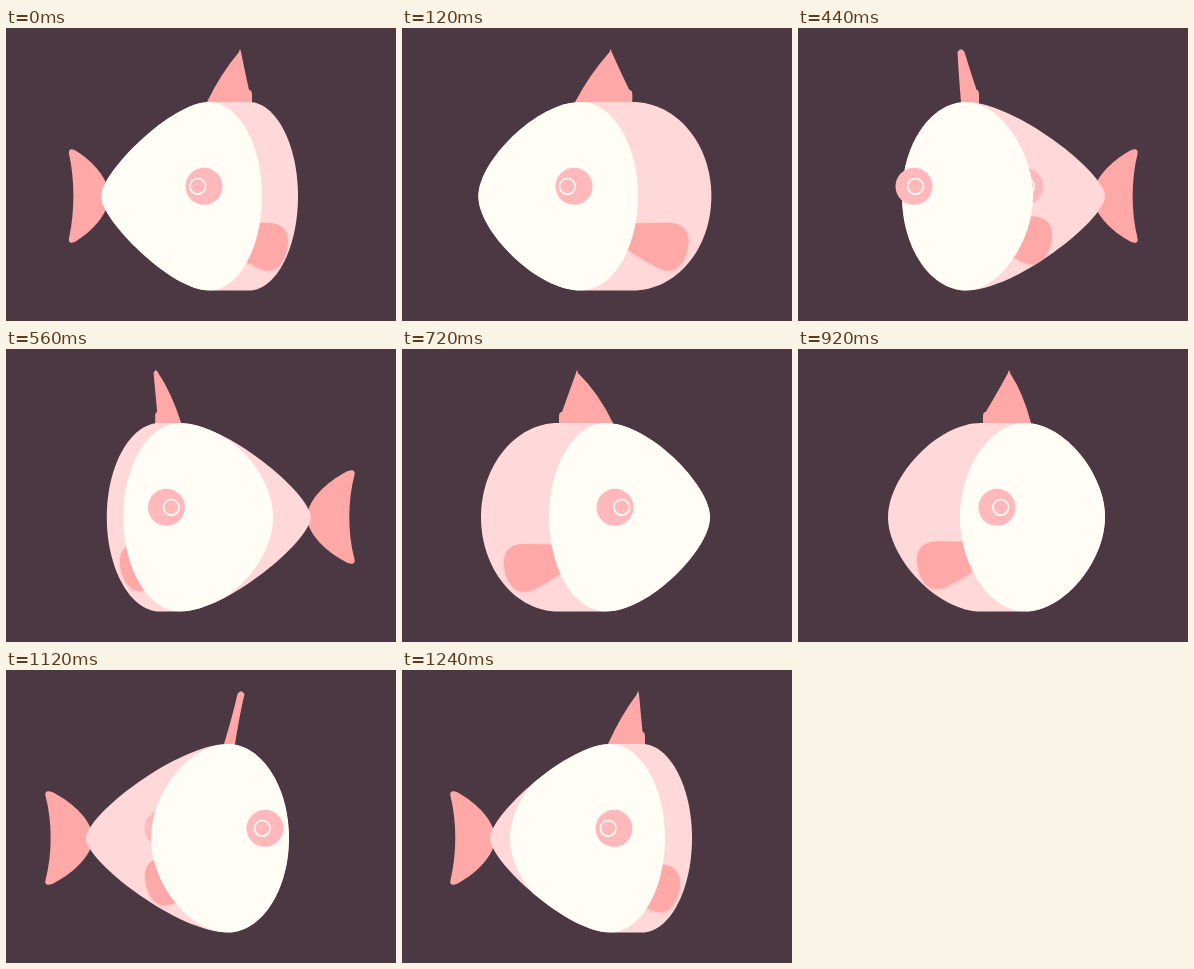
These frames come from a looping animation (390 by 293 pixels, 1.28 s). An HTML page with a canvas:

```html
<!DOCTYPE html>
<html lang="en">
<head>
<meta charset="utf-8">
<title>Turning fish</title>
<style>
html, body { margin: 0; width: 100%; height: 100%; overflow: hidden; background: #4b3842; }
canvas { display: block; width: 390px; height: 293px; }
</style>
</head>
<body>
<canvas id="stage"></canvas>
<script>
const W = 390, H = 293, STEP = 40, STEPS = 32, HALF = 16;
const MIRROR = 388, AXIS = MIRROR / 2;
const TOP = 74, MID = 168.2, RY = 94.3, BOTTOM = MID + RY;
const COLOR = { back: '#4b3842', cream: '#fffdf6', pink: '#ffd9d9', fin: '#ffa8a8', eye: '#ffb9bb' };

const canvas = document.getElementById('stage');
const ctx = canvas.getContext('2d');
const ratio = window.devicePixelRatio || 1;
canvas.width = W * ratio;
canvas.height = H * ratio;
ctx.scale(ratio, ratio);

// step | cream left, top, right | body left, far top, right | dorsal left, apex, right | notch, sharp left, sharp right
const half = [
  [-2, 153, 220, 284,  81, 220, 284, 207, 225, 225, -.8, 1, 0],
  [-1, 145, 222, 283,  80, 222, 283, 218, 235, 229, 0, 1, 0],
  [2, 108, 208, 263,  88, 240, 290, 206, 236, 243, .8, 1, 0],
  [3,  96, 203, 256,  95, 243, 292, 201, 234, 246, 1, 1, 0],
  [5,  80, 184, 241,  80, 232, 309, 177, 213, 231, 1, .7, 0],
  [9,  78, 169, 228,  78, 222, 296, 169, 196, 225, .9, .4, .1],
  [10, 81, 161, 226,  81, 205, 298, 155, 177, 203, .9, .3, .4]
];

// The second half turn is the first one seen in a mirror.
function mirrored([k, cL, cT, cR, bL, pT, bR, dL, dA, dR, n, sL, sR]) {
  const m = x => MIRROR - x;
  return [k + HALF, m(cR), m(cT), m(cL), m(bR), m(pT), m(bL), m(dR), m(dA), m(dL), -n, sR, sL];
}
const poses = half.concat(half.map(mirrored));

const eyeTrack = [[-2, 272], [-1, 259], [2, 212], [3, 198], [5, 175], [9, 185], [10, 189], [14, 227], [15, 231]];
const pectoralTrack = [[2, 278], [3, 282], [5, 286], [9, 278], [10, 269], [14, 254], [15, 249]];

// Periodic Hermite curve through unevenly spaced keys.
function sample(track, s, col) {
  const n = track.length;
  const key = i => {
    const turn = Math.floor(i / n);
    const row = track[i - turn * n];
    return [row[0] + turn * STEPS, row[col]];
  };
  const first = track[0][0];
  s = first + ((s - first) % STEPS + STEPS) % STEPS;
  let i = 0;
  while (key(i + 1)[0] <= s) i++;
  const [a, b, c, d] = [key(i - 1), key(i), key(i + 1), key(i + 2)];
  const slope = (p, q) => (q[1] - p[1]) / (q[0] - p[0]);
  const gap = c[0] - b[0], before = b[0] - a[0], after = d[0] - c[0];
  const mid = slope(b, c);
  const m0 = (slope(a, b) * gap + mid * before) / (gap + before);
  const m1 = (mid * after + slope(c, d) * gap) / (gap + after);
  const u = (s - b[0]) / gap, v = 1 - u;
  return b[1] * v * v * (1 + 2 * u) + c[1] * u * u * (3 - 2 * u)
    + gap * u * v * (m0 * v - m1 * u);
}

function shell(left, topL, topR, right, sharpL, sharpR) {
  const flat = p => .55 - .2 * p, steep = p => .55 - .3 * p;
  const l = topL - flat(sharpL) * (topL - left), lh = steep(sharpL) * RY;
  const r = topR + flat(sharpR) * (right - topR), rh = steep(sharpR) * RY;
  const path = new Path2D();
  path.moveTo(topL, TOP);
  path.lineTo(topR, TOP);
  path.bezierCurveTo(r, TOP, right, MID - rh, right, MID);
  path.bezierCurveTo(right, MID + rh, r, BOTTOM, topR, BOTTOM);
  path.lineTo(topL, BOTTOM);
  path.bezierCurveTo(l, BOTTOM, left, MID + lh, left, MID);
  path.bezierCurveTo(left, MID - lh, l, TOP, topL, TOP);
  return path;
}

function fill(path, color) {
  ctx.fillStyle = color;
  ctx.fill(path);
}

function drawTail(angle) {
  const x = r => AXIS - r * Math.cos(angle);
  const p = new Path2D();
  p.moveTo(x(157.5), 126);
  p.bezierCurveTo(x(159), 120, x(153), 120, x(147), 124);
  p.bezierCurveTo(x(130), 133, x(110), 150, x(109), MID);
  p.bezierCurveTo(x(110), 186, x(130), 203, x(147), 212);
  p.bezierCurveTo(x(153), 216, x(159), 216, x(157.5), 210);
  p.bezierCurveTo(x(150.5), 184, x(150.5), 152, x(157.5), 126);
  fill(p, COLOR.fin);
}

function drawDorsal(left, apex, right, notch) {
  const tip = Math.max(1, Math.min(3.5, (40 - right + left) / 6));
  const inL = left + 3 * Math.max(0, -notch), inR = right - 3 * Math.max(0, notch);
  const bulgeL = notch > 0 ? 3 * notch : 0, bulgeR = notch < 0 ? -3 * notch : 0;
  const p = new Path2D();
  p.moveTo(left, 82);
  p.lineTo(left, notch < 0 ? 67 : 74);
  if (notch < 0) p.quadraticCurveTo(left, 63, inL, 63);
  p.quadraticCurveTo((left + apex) / 2 - bulgeL, 46, apex - tip, 24);
  p.quadraticCurveTo(apex, 18.5, apex + tip, 24);
  p.quadraticCurveTo((inR + apex + tip) / 2 + bulgeR, 44, inR, notch > 0 ? 62 : 74);
  if (notch > 0) p.quadraticCurveTo(right, 62, right, 67);
  p.lineTo(right, 82);
  fill(p, COLOR.fin);
}

function drawPectoral(s, flip) {
  const r = sample(pectoralTrack, s, 1);
  const y = 238 + 5 * Math.cos((s - 4.4) * Math.PI / HALF);
  const x = d => flip ? MIRROR - r + d : r - d;
  const p = new Path2D();
  p.moveTo(x(68), y - 47);
  p.lineTo(x(24), y - 48);
  p.bezierCurveTo(x(8), y - 49, x(0), y - 42, x(0), y - 30);
  p.bezierCurveTo(x(0), y - 14, x(9), y, x(19), y);
  p.bezierCurveTo(x(30), y, x(44), y - 11, x(68), y - 25);
  ctx.save();
  ctx.shadowColor = 'rgba(255,168,168,.5)';
  ctx.shadowBlur = 3 * ratio;
  ctx.shadowOffsetY = ratio;
  fill(p, COLOR.fin);
  ctx.restore();
}

function drawEye(s, flip) {
  const x = sample(eyeTrack, s, 1);
  const ring = x - 6.8 * Math.cos((s - 4.9) * Math.PI / HALF);
  const place = v => flip ? MIRROR - v : v;
  ctx.beginPath();
  ctx.arc(place(x), 158.3, 18.5, 0, 7);
  ctx.fillStyle = COLOR.eye;
  ctx.fill();
  ctx.beginPath();
  ctx.arc(place(ring), 158.3, 7.8, 0, 7);
  ctx.strokeStyle = COLOR.cream;
  ctx.lineWidth = 1.6;
  ctx.stroke();
}

function draw(s) {
  const [cL, cT, cR, bL, pT, bR, dL, dA, dR, notch, sL, sR] =
    poses[0].slice(1).map((_, i) => sample(poses, s, i + 1));
  const other = (s + HALF) % STEPS;
  const nearFirst = (s + 4) % STEPS < HALF;

  ctx.fillStyle = COLOR.back;
  ctx.fillRect(0, 0, W, H);
  drawTail(s * Math.PI / HALF);
  drawDorsal(dL, dA, dR, notch);

  const body = shell(bL, Math.min(cT, pT), Math.max(cT, pT), bR, sL, sR);
  fill(body, COLOR.pink);
  ctx.save();
  ctx.clip(body);
  drawEye(nearFirst ? other : s, nearFirst);
  drawPectoral(s, false);
  drawPectoral(other, true);
  fill(shell(cL, cT, cT, cR, .25 * sL, .25 * sR), COLOR.cream);
  ctx.restore();
  drawEye(nearFirst ? s : other, !nearFirst);
}

const start = performance.now();
function frame() {
  const time = performance.now() - start;
  draw((Math.floor(time / STEP) + 3) % STEPS);
  requestAnimationFrame(frame);
}
frame();
</script>
</body>
</html>
```
